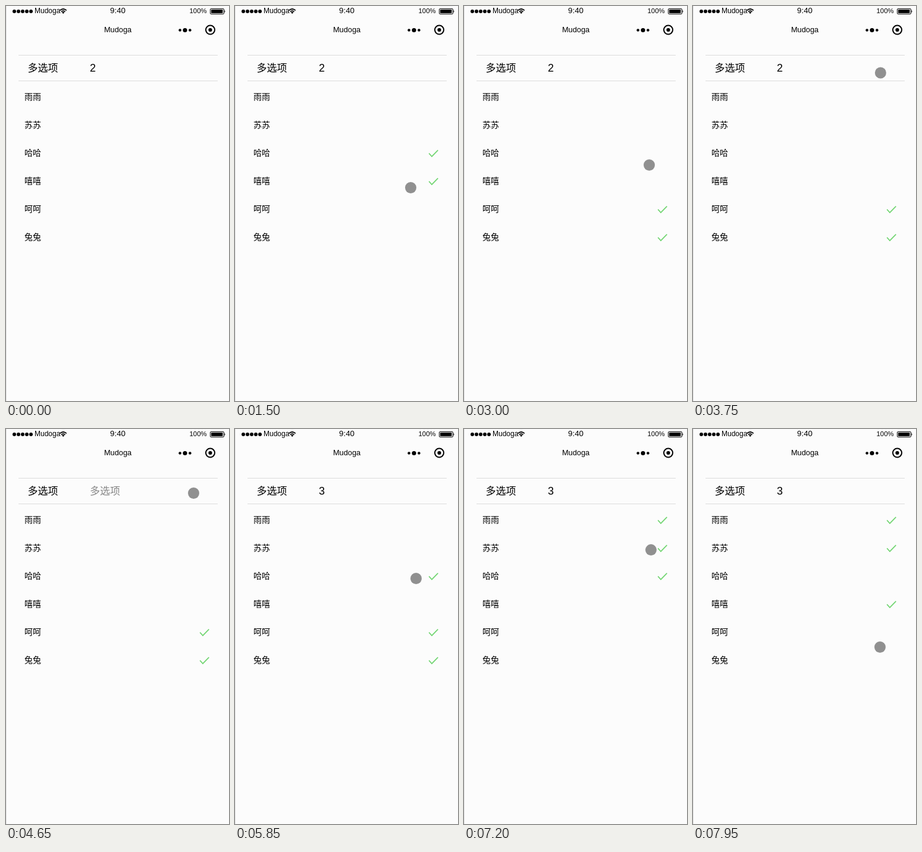
An HTML page for the animation above (8 s loop, 375 by 662 pixels).

```html
<!DOCTYPE html>
<html lang="zh-CN">
<head>
<meta charset="utf-8">
<title>多选项</title>
<style>
  html, body { margin: 0; width: 100%; height: 100%; overflow: hidden; background: #fcfcfc; }
  svg { display: block; width: 100vw; height: 100vh; }
  text { font-family: "Liberation Sans", "Noto Sans CJK SC", "Noto Sans CJK", sans-serif; }
  .mid { text-anchor: middle; }
  .line { fill: none; stroke: #000; }
  .tick { fill: none; stroke: #72d572; stroke-width: 1.7; }
</style>
</head>
<body>
<svg viewBox="0 0 375 662">
  <rect width="375" height="662" fill="#fcfcfc"/>
  <rect width="1" height="662" fill="#e2e2e2"/>

  <g id="signal"></g>
  <text x="48" y="12.3" font-size="12">Mudoga</text>
  <g class="line" stroke-width="1.7">
    <path d="M90.6 7.4Q96.2 2.6 101.8 7.4"/>
    <path d="M92.8 9.6Q96.2 6.6 99.6 9.6"/>
  </g>
  <path d="M94 10.7Q96.2 9 98.4 10.7L96.2 13Z"/>
  <text class="mid" x="188" y="12.4" font-size="13.3">9:40</text>
  <text x="308.5" y="12.3" font-size="11.4">100%</text>
  <rect class="line" x="343.5" y="4.5" width="23" height="9" rx="1.5"/>
  <rect x="345" y="6" width="19.5" height="6" rx=".5"/>
  <path d="M367.5 7Q369.6 9 367.5 11Z"/>

  <text class="mid" x="188" y="44.3" font-size="12.8">Mudoga</text>
  <circle cx="292.6" cy="40.5" r="2.3"/>
  <circle cx="301" cy="40.5" r="3.6"/>
  <circle cx="309.4" cy="40.5" r="2.3"/>
  <circle class="line" cx="343.5" cy="40" r="7.5" stroke-width="2"/>
  <circle cx="343.5" cy="40" r="3.1"/>

  <path d="M21 82.5H356M21 125.5H356" stroke="#dcdcdc"/>
  <text x="36.5" y="110" font-size="17">多选项</text>
  <text id="field" x="141" y="110"></text>
  <rect id="caret" y="93" width="1" height="23"/>

  <g id="rows"></g>
  <circle id="pointer" r="9.5" fill="#909090"/>
</svg>
<script>
const LOOP = 8000, STEP = 150;
const NAMES = ['雨雨', '苏苏', '哈哈', '嘻嘻', '呵呵', '兔兔'];
const ERASE = 4350, TYPE = 5250;

// Pointer stops; a stop with a row picks that row on arrival
const STOPS = [
  { at: 150, x: 331.5, y: 377.5 },
  { at: 600, x: 336.5, y: 294, row: 3 },
  { at: 1050, x: 263.5, y: 249.5, row: 2 },
  { at: 1500, x: 295.5, y: 304.5 },
  { at: 2100, x: 302.5, y: 355.5, row: 4 },
  { at: 2700, x: 304, y: 398.5, row: 5 },
  { at: 3000, x: 311.5, y: 266.5 },
  { at: 3900, x: 315.5, y: 107.5 },
  { at: TYPE, x: 315.5, y: 107.5 },
  { at: 5850, x: 304.5, y: 250.5 },
  { at: 6150, x: 303, y: 249, row: 2 },
  { at: 6450, x: 322.5, y: 200.5 },
  { at: 6600, x: 322.5, y: 199, row: 1 },
  { at: 7050, x: 313, y: 149.5, row: 0 },
  { at: 7800, x: 317, y: 297, row: 3 },
  { at: 7950, x: 314.5, y: 365.5 }
];

const $ = id => document.getElementById(id);
const within = (t, a, b) => t >= a && t < b;
const easeOut = k => 1 - (1 - k) ** 2;
const mix = (a, b, k) => a + (b - a) * k;

function set(el, attrs) {
  for (const key in attrs) el.setAttribute(key, attrs[key]);
  return el;
}

function add(parent, tag, attrs, text = '') {
  const el = set(document.createElementNS('http://www.w3.org/2000/svg', tag), attrs);
  el.textContent = text;
  return parent.appendChild(el);
}

function show(el, on) {
  set(el, { visibility: on ? 'visible' : 'hidden' });
}

for (let i = 0; i < 5; i++) add($('signal'), 'circle', { cx: 14 + 7 * i, cy: 9, r: 3 });

const ticks = NAMES.map((name, i) => {
  const y = 153 + 47 * i;
  add($('rows'), 'text', { x: 31, y: y + 4, 'font-size': 14 }, name);
  return add($('rows'), 'path', { class: 'tick', d: `M326.2 ${y - .1}l4.8 5.3 10.3-10.6` });
});

function pointerAt(t) {
  const next = STOPS.findIndex(s => s.at > t);
  const a = STOPS.at(next < 0 ? -1 : Math.max(next - 1, 0));
  const b = next < 0 ? a : STOPS[next];
  const k = a === b ? 0 : easeOut((t - a.at) / (b.at - a.at));
  return { cx: mix(a.x, b.x, k), cy: mix(a.y, b.y, k) };
}

// Each pick drops the oldest one above the limit
function chosenAt(t) {
  return STOPS
    .filter(s => s.row !== undefined && s.at <= t)
    .map(s => s.row)
    .slice(t < TYPE ? -2 : -3);
}

function render(ms) {
  const t = Math.floor(ms / STEP) * STEP;

  const chosen = chosenAt(t);
  ticks.forEach((el, i) => show(el, chosen.includes(i)));

  const empty = within(t, ERASE, TYPE);
  $('field').textContent = empty ? '多选项' : t < ERASE ? '2' : '3';
  set($('field'), { fill: empty ? '#888' : '#000', 'font-size': empty ? 17 : 18 });

  set($('caret'), { x: empty ? 141 : 151 });
  show($('caret'), within(t, 4050, 4650) || within(t, 4950, 5700));

  // The pointer hides while keys are pressed
  const typing = within(t, ERASE, ERASE + 300) || within(t, TYPE - 300, TYPE);
  set($('pointer'), pointerAt(t));
  show($('pointer'), t >= STOPS[0].at && !typing);
}

const start = performance.now();
function frame() {
  render((performance.now() - start) % LOOP);
  requestAnimationFrame(frame);
}
frame();
</script>
</body>
</html>
```
